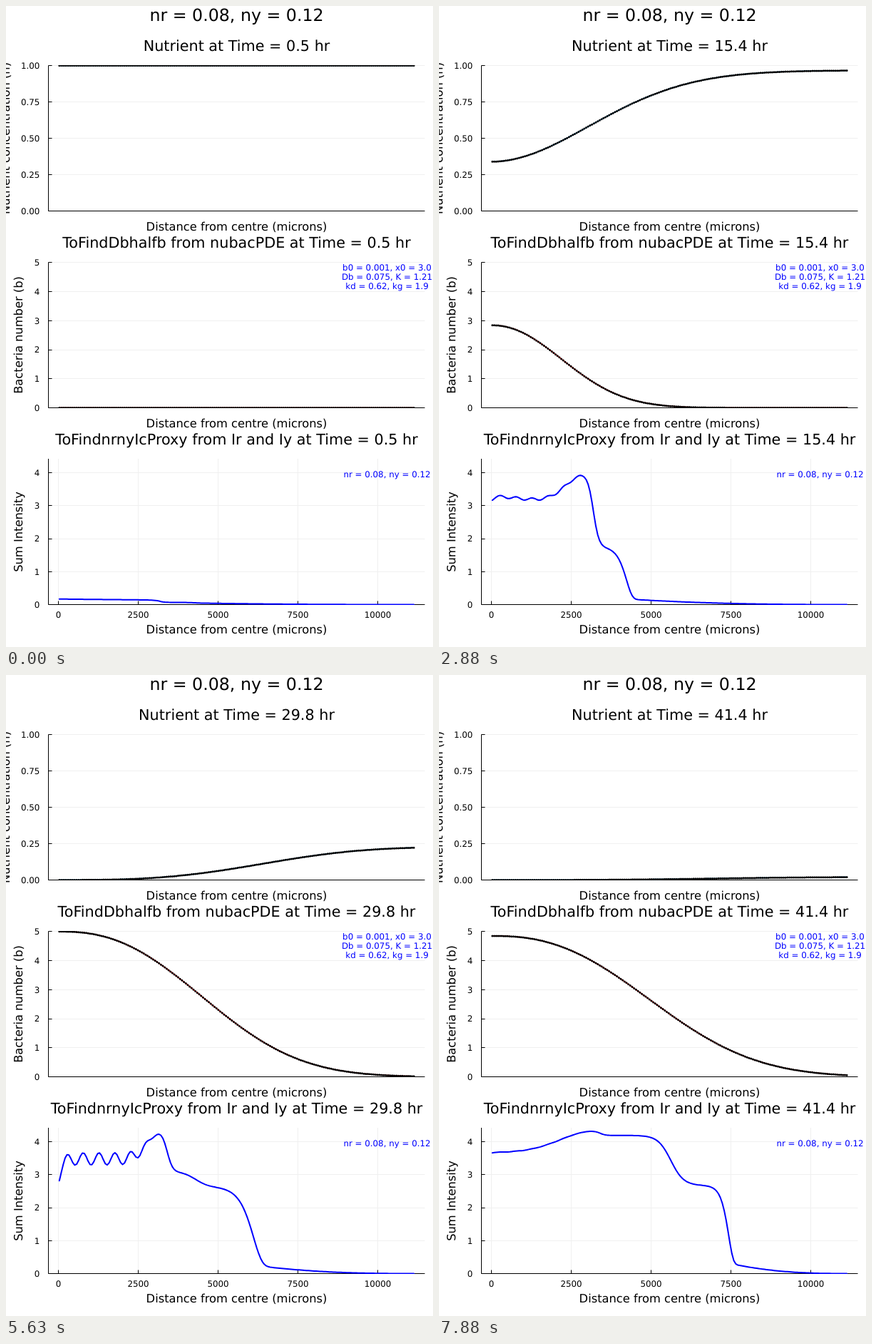
These frames come from a looping animation (599x899 px, 8000 ms). An HTML page:

```html
<!DOCTYPE html>
<html lang="en">
<head>
<meta charset="utf-8">
<title>Nutrient and bacteria profiles</title>
<style>
html, body { margin: 0; width: 100%; height: 100%; overflow: hidden; background: #fff; }
svg { display: block; }
text { font-family: "DejaVu Sans", sans-serif; text-anchor: middle; text-rendering: geometricPrecision; }
path { fill: none; stroke-linejoin: round; }
</style>
</head>
<body>
<svg id="stage" width="599" height="899" viewBox="0 0 599 899"></svg>
<script>
const stage = document.getElementById('stage');
const LEFT = 59.5, RIGHT = 587.5, ORIGIN = 73.5, BLUE = '#00f';
const SMALL = 11.85, LABEL = 16.3, TITLE = 20.74, HEAD = 23.7;

function add(tag, attrs, content = '') {
  const el = document.createElementNS('http://www.w3.org/2000/svg', tag);
  for (const key in attrs) el.setAttribute(key, attrs[key]);
  el.textContent = content;
  return stage.appendChild(el);
}
const text = (x, y, size, content, extra) => add('text', { x, y, 'font-size': size, ...extra }, content);
const line = (d, stroke = '#000') => add('path', { d, stroke, 'stroke-width': 1 });

// Axes, grid and labels; returns the title element and the clip for the data.
function panel({ top, zero, unit, ticks, digits, name, nameX, labelY, xTicks = [] }) {
  const yOf = v => zero - v * unit;
  const xOf = v => ORIGIN + v * 0.0448;
  for (const v of ticks) line(`M${LEFT} ${Math.floor(yOf(v)) + 0.5}H${RIGHT}`, '#f0f0f0');
  for (const v of xTicks) line(`M${xOf(v)} ${top}V${zero}`, '#f0f0f0');
  line(`M${LEFT} ${top}V${zero}H${RIGHT}`);
  for (const v of ticks) {
    line(`M${LEFT} ${Math.floor(yOf(v)) + 0.5}h5`);
    text(47.3, yOf(v) + 4.4, SMALL, v.toFixed(digits), { style: 'text-anchor:end' });
  }
  for (const v of xTicks) {
    line(`M${xOf(v)} ${zero}v-5`);
    text(xOf(v), 858, SMALL, v);
  }
  text(323.5, labelY, LABEL, 'Distance from centre (microns)');
  text(0, 0, LABEL, name, { transform: `translate(${nameX} ${zero - 102}) rotate(-90)` });
  const id = 'clip' + zero;
  add('clipPath', { id }).innerHTML =
    `<rect x="${LEFT}" y="${top - 0.5}" width="${RIGHT - LEFT}" height="${zero - top + 1}"/>`;
  return { title: text(323.5, zero - 224.5, TITLE), clip: `url(#${id})`, yOf };
}

text(323.5, 20.7, HEAD, 'nr = 0.08, ny = 0.12');
const nutrient = panel({
  top: 83.5, zero: 287.5, unit: 204, ticks: [0, 0.25, 0.5, 0.75, 1], digits: 2,
  name: 'Nutrient concentration (n)', nameX: 4.5, labelY: 315.3
});
const bacteria = panel({
  top: 359.5, zero: 563.5, unit: 40.75, ticks: [0, 1, 2, 3, 4, 5], digits: 0,
  name: 'Bacteria number (b)', nameX: 23, labelY: 591.3
});
const intensity = panel({
  top: 635, zero: 839.5, unit: 46.25, ticks: [0, 1, 2, 3, 4], digits: 0,
  name: 'Sum Intensity', nameX: 23, labelY: 880.3, xTicks: [0, 2500, 5000, 7500, 10000]
});
['b0 = 0.001, x0 = 3.0', 'Db = 0.075, K = 1.21', 'kd = 0.62, kg = 1.9']
  .forEach((s, i) => text(534.5, 371.3 + 13 * i, SMALL, s, { fill: BLUE }));
text(534.5, 660.8, SMALL, 'nr = 0.08, ny = 0.12', { fill: BLUE });

const curve = (p, stroke, width) => add('path', {
  stroke, 'stroke-width': width, 'stroke-linecap': 'round', 'clip-path': p.clip
});
const nLine = curve(nutrient, '#009afa', 1.4), nDots = curve(nutrient, '#000', 3);
const bLine = curve(bacteria, '#f00', 1.4), bDots = curve(bacteria, '#000', 3);
const iLine = curve(intensity, BLUE, 2);

const { exp, max, min, abs, cos, PI } = Math;
const sigmoid = z => 1 / (1 + exp(-z));
const gauss = z => exp(-z * z);
const mix = (a, b, k) => a + (b - a) * k;

// Each model takes a step and returns a function of x in pixels.

// Nutrient is eaten from the centre outwards.
function nutrientAt(s) {
  const centre = (1 + exp(0.45 * (s - 20.1))) ** -0.7;
  const edge = exp(-0.0048 * max(0, s - 20) ** 1.78);
  const width = 140 + 1.5 * s + 120 * sigmoid(0.3 * (s - 28));
  const power = 1.8 + 1.3 * sigmoid(0.22 * (s - 32));
  return x => mix(edge, centre, exp(-(((x - ORIGIN) / width) ** power)));
}

// Bacteria grow logistically in a colony that widens.
function bacteriaAt(s) {
  const peak = (5.01 - 0.00028 * (s - 39) ** 2) * sigmoid(0.38 * (s - 22.2));
  const spread = sigmoid(0.28 * (s - 31.6));
  const width = 97 + 1.2 * s + 100 * spread;
  const power = 2.1 + 0.38 * spread;
  return x => peak * exp(-(((x - ORIGIN) / width) ** power));
}

// Intensity in pixels: rippled plateau, ridge, two shelves, moving front and faint tail.
function intensityAt(s) {
  const u = max(0, s - 23);
  const growth = min(1, 0.049 * exp(0.13 * s));
  const later = sigmoid(0.5 * (s - 22.2));
  const plateau = 157 * growth + 0.008 * u * u;
  const slope = 0.0018 * (1 - later);
  const ridge = (46 - 0.4 * u) * growth ** 1.5;
  const ridgeWidth = 8 + 2.2 * abs(s - 37);
  const ridgeEnd = 216 + 11 * sigmoid(0.5 * (s - 28));
  const shelf = 3 + 130 * later + 0.00095 * u ** 3;
  const drop = 2.7 * max(0, s - 37);
  const front = 263 + 4.1 * u - 0.013 * u * u;
  const frontWidth = 6.5 + 8 * gauss((s - 38) / 12);
  const ripple = 11 * gauss((s - 39) / 12);
  const tail = 7.5 * exp(0.054 * s);
  return x => {
    const inner = plateau * (1 - slope * (x - 75))
      + ridge * gauss((x - ridgeEnd + 10) / ridgeWidth)
      + ripple * sigmoid((195 - x) / 8) * cos((x - 86) / 22.25 * 2 * PI)
      - 2.5 * ripple * exp((75 - x) / 5);
    const outer = shelf - drop * sigmoid((x - front + 81) / 9);
    const body = mix(outer, inner, sigmoid((ridgeEnd - x) / 4));
    const haze = tail * ((573 - x) / 499) ** 2.5;
    return mix(haze, body, exp(-exp((x - front) / frontWidth)));
  };
}

const XS = Array.from({ length: 186 }, (_, i) => 74.84 + 2.688 * i);

function plot(yAt, linePath, dotPath) {
  const pts = XS.map(x => x.toFixed(2) + ' ' + yAt(x).toFixed(2));
  linePath.setAttribute('d', 'M' + pts.join('L'));
  if (dotPath) dotPath.setAttribute('d', pts.map(p => `M${p}h0`).join(''));
}

// Hours advance by 0.65 per step, rounded half to even.
function hours(step) {
  const tenths = 5 + 6.5 * step;
  return ((tenths % 1 ? 2 * Math.round(tenths / 2) : tenths) / 10).toFixed(1);
}

function draw(step) {
  const when = ` at Time = ${hours(step)} hr`;
  nutrient.title.textContent = 'Nutrient' + when;
  bacteria.title.textContent = 'ToFindDbhalfb from nubacPDE' + when;
  intensity.title.textContent = 'ToFindnrnyIcProxy from Ir and Iy' + when;

  const n = nutrientAt(step), b = bacteriaAt(step), i = intensityAt(step);
  plot(x => nutrient.yOf(n(x)), nLine, nDots);
  plot(x => bacteria.yOf(b(x)), bLine, bDots);
  plot(x => 839.5 - i(x), iLine);
}

let shown = -1;
function tick() {
  const step = Math.floor(Math.floor(performance.now() % 8000 / 10) / 12.5);
  if (step !== shown) draw(shown = step);
  requestAnimationFrame(tick);
}
tick();
</script>
</body>
</html>
```
